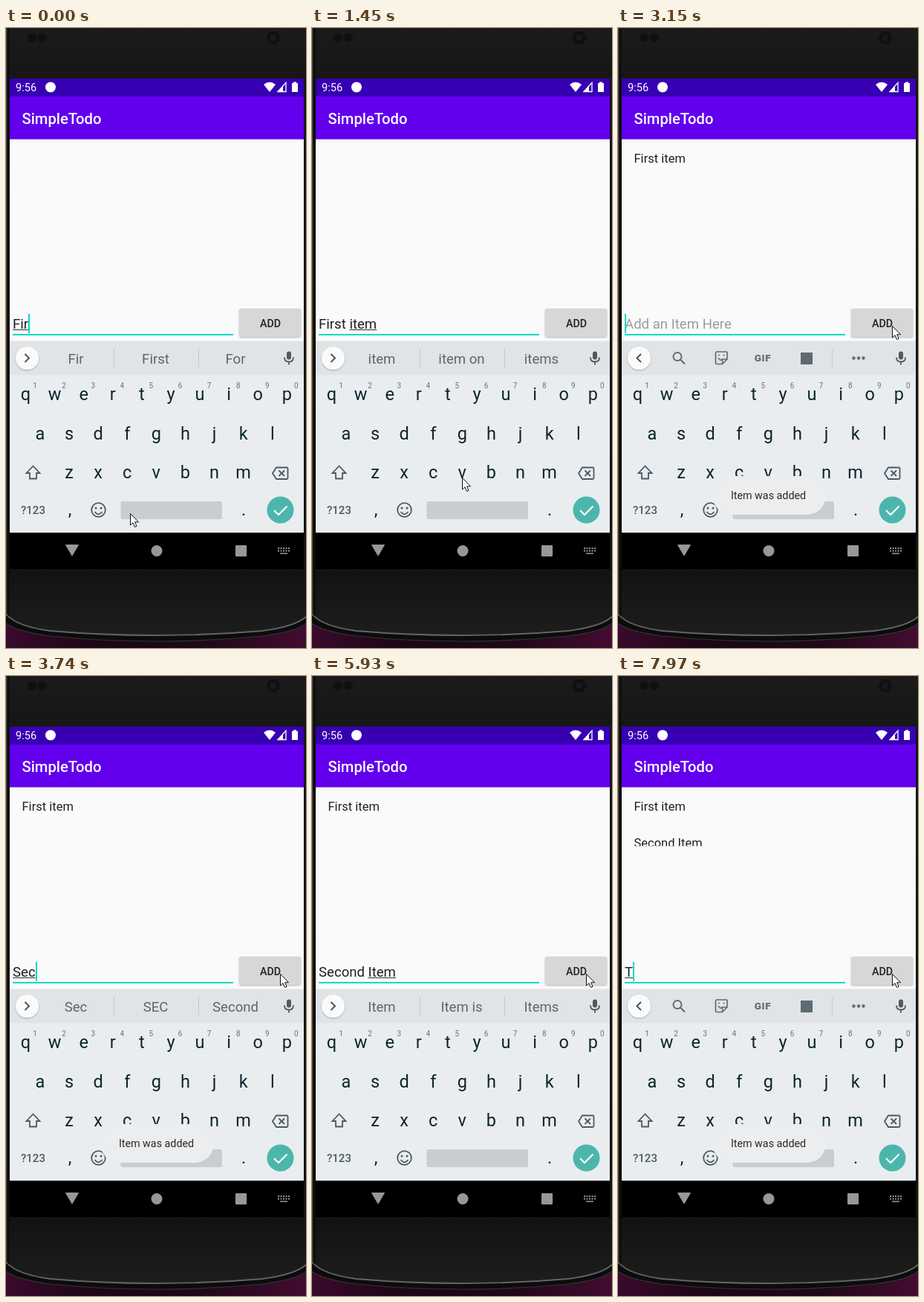
An HTML page for the animation above (8 s loop, 404 by 833 pixels).

```html
<!DOCTYPE html>
<html lang="en">
<head>
<meta charset="utf-8">
<title>SimpleTodo</title>
<style>
html, body { margin: 0; width: 100%; height: 100%; overflow: hidden; background: #141414; }
svg { display: block; width: 404px; height: 833px; font-family: Roboto, sans-serif; }
text { white-space: pre; }
.mid { text-anchor: middle; }
.key { font-size: 23.5px; fill: #0d252d; text-anchor: middle; }
.digit { font-size: 10px; fill: #66727a; text-anchor: middle; }
.sugg { font-size: 18.6px; fill: #5a666d; text-anchor: middle; }
.item { font-size: 16.5px; fill: #212121; }
.field { font-size: 18.6px; }
.line { fill: none; stroke: #4a5a63; stroke-width: 1.8; }
.tool { fill: none; stroke: #5f6b72; stroke-width: 2; }
</style>
</head>
<body>
<svg viewBox="0 0 404 833">
  <defs>
    <linearGradient id="shell" x2="0" y2="1">
      <stop offset="0" stop-color="#1b1b1b"/><stop offset=".08" stop-color="#161616"/>
      <stop offset=".9" stop-color="#131313"/><stop offset="1" stop-color="#1d1d1d"/>
    </linearGradient>
    <linearGradient id="floor">
      <stop offset="0" stop-color="#390a2c"/><stop offset=".3" stop-color="#1b0716"/>
      <stop offset=".65" stop-color="#1d0818"/><stop offset="1" stop-color="#430c31"/>
    </linearGradient>
    <filter id="soft" x="-20%" y="-30%" width="140%" height="170%">
      <feDropShadow dx="0" dy="1" stdDeviation="1" flood-opacity=".28"/>
    </filter>
    <clipPath id="rowClip"><rect x="5" y="150" width="396" height="78.5"/></clipPath>
  </defs>

  <!-- phone shell -->
  <rect width="404" height="833" fill="url(#floor)"/>
  <path d="M0 0H404V800Q392 811 345 817Q275 824 202 824Q130 824 60 817Q14 811 0 800Z" fill="#0c0c0c"/>
  <path d="M1 0H404V792Q390 804 345 810Q275 816 202 816Q130 816 60 810Q14 804 1 790Z" fill="url(#shell)"/>
  <path d="M1 788Q14 804 60 810Q130 816 202 816Q275 816 345 810Q390 804 404 791" fill="none" stroke="#646464" stroke-width="1.8"/>
  <path d="M0 800Q14 811 60 817Q130 824 202 824Q275 824 345 817Q392 811 404 800" fill="none" stroke="#333" stroke-width="1.2"/>
  <path d="M.5 0V790" stroke="#4b4b4b"/>
  <path d="M3.5 0V790" stroke="#0b0b0b" stroke-width="2"/>
  <g fill="#101010"><circle cx="35" cy="13" r="6"/><circle cx="49" cy="13" r="6"/><circle cx="360" cy="13" r="9"/></g>
  <circle cx="360" cy="13" r="4" fill="#17172a"/>

  <!-- app -->
  <rect x="5" y="68" width="396" height="24" fill="#3700b3"/>
  <rect x="5" y="92" width="396" height="58" fill="#6200ee"/>
  <rect x="5" y="149.5" width="396" height="272" fill="#fafafa"/>
  <g fill="#fff">
    <text x="13" y="85" font-size="14.6">9:56</text>
    <circle cx="60" cy="79.5" r="7"/>
    <path d="M347 76Q355 69.500 363 76L355 86Z"/>
    <path d="M366 85.500H377V73.500Z" fill="none" stroke="#fff" stroke-width="1.3"/>
    <path d="M365 86L373 77.500V86Z"/>
    <path d="M385 74H387V72.500H391V74H393V86H385Z"/>
    <text x="21.500" y="129" font-size="20.2" font-weight="500">SimpleTodo</text>
  </g>
  <g clip-path="url(#rowClip)">
    <text id="first" class="item" x="21.500" y="180.500">First item</text>
    <text id="second" class="item" x="21.500" y="229.500">Second Item</text>
  </g>

  <rect x="9" y="411" width="297" height="2" fill="#03dac5"/>
  <text id="hint" class="field" x="9" y="404" fill="#9b9b9b">Add an Item Here</text>
  <text id="typed" class="field" x="9" y="404" fill="#212121"></text>
  <rect id="compose" y="405" height="1" fill="#333"/>
  <rect id="caret" y="384" width="2" height="26" fill="#03dac5"/>
  <rect id="button" x="314" y="377" width="83" height="38" rx="2" filter="url(#soft)"/>
  <text class="mid" x="356" y="402" font-size="14.3" font-weight="500" fill="#212121">ADD</text>

  <!-- keyboard -->
  <rect x="5" y="420.500" width="396" height="46" fill="#e0e4e7"/>
  <rect x="5" y="466" width="396" height="212" fill="#e9edf0"/>
  <circle cx="28.500" cy="443.500" r="15.500" fill="#fafafa" filter="url(#soft)"/>
  <path id="chevron" fill="none" stroke="#4b5358" stroke-width="2"/>
  <g id="words">
    <path d="M145.500 431V456M259.500 431V456" stroke="#c4c9cc"/>
    <text class="sugg" x="94" y="450.500"></text>
    <text class="sugg" x="201.500" y="450.500"></text>
    <text class="sugg" x="309" y="450.500"></text>
  </g>
  <g id="tools">
    <g class="tool">
      <circle cx="80" cy="441.500" r="5.500"/><path d="M84 445.500L90 451.500"/>
      <path d="M133 435H146Q147 435 147 436V445L140.500 451.500H133Q131.500 451.500 131.500 450V436.500Q131.500 435 133 435ZM147 445H140.500V451.500" stroke-width="1.7"/>
      <path d="M135 443Q137.500 448 140 445M135 439.500H137M141.500 439.500H143.500" stroke-width="1.6"/>
    </g>
    <text class="mid" x="195" y="448" font-size="13.5" font-weight="800" fill="#5f6b72" letter-spacing=".6">GIF</text>
    <rect x="246" y="436" width="16" height="16" fill="#5f6b72"/>
    <path d="M288.500 432V455" stroke="#c4c9cc"/>
    <g fill="#5f6b72"><circle cx="317.500" cy="443.500" r="2.200"/><circle cx="324" cy="443.500" r="2.200"/><circle cx="330.500" cy="443.500" r="2.200"/></g>
  </g>
  <rect x="378" y="434.500" width="6" height="11" rx="3" fill="#4f5b62"/>
  <path d="M375 442.500Q375 448.500 381 448.500Q387 448.500 387 442.500M381 448.500V452.500" class="line" style="stroke:#4f5b62"/>

  <g id="keys"></g>
  <g class="line">
    <path d="M36.500 588.500L27.500 598H32V605.500H41V598H45.500Z"/>
    <path d="M364 590.500H378Q379.500 590.500 379.500 592V604.500Q379.500 606 378 606H364L359 598.250ZM367.500 594.500L375 602M375 594.500L367.500 602"/>
    <circle cx="124.500" cy="647.500" r="9.300"/>
    <path d="M119.500 650Q124.500 656.500 129.500 650"/>
  </g>
  <g fill="#4a5a63"><circle cx="121" cy="645" r="1.500"/><circle cx="128" cy="645" r="1.500"/></g>
  <text class="mid" x="36.500" y="653" font-size="15" font-weight="500" fill="#4a5a63">?123</text>
  <text class="key" x="86" y="655">,</text>
  <text class="key" x="320" y="655">.</text>
  <rect x="154.500" y="636" width="136.500" height="24" rx="3" fill="#c8cdd0"/>
  <circle cx="369.500" cy="647.500" r="18" fill="#4db6ac"/>
  <path d="M361 648L367 654L378.500 642.500" fill="none" stroke="#fff" stroke-width="2.200"/>

  <!-- navigation bar -->
  <rect x="5" y="678" width="396" height="49" fill="#000"/>
  <g fill="#989898">
    <path d="M80.500 694.500H97.500L89 709Z" stroke="#989898" stroke-linejoin="round"/>
    <circle cx="203" cy="702.500" r="7.500"/>
    <rect x="309" y="695" width="15" height="15" rx="1"/>
  </g>
  <path d="M366 699H382M366 702.500H382" stroke="#989898" stroke-width="1.800" stroke-dasharray="2 1.500"/>
  <path d="M369 706H379" stroke="#989898" stroke-width="1.500"/>

  <g id="toast">
    <rect x="127" y="602" width="153" height="52" rx="26" fill="#ebedef"/>
    <text class="mid" x="202.500" y="633" font-size="14.3" fill="#2a2a2a">Item was added</text>
  </g>
  <path id="mouse" d="M.5 .5V16L4 12.700L6.500 18.500L9 17.400L6.600 11.800H11.500Z" fill="#fff" stroke="#111"/>
</svg>
<script>
const LOOP = 8000;
const $ = id => document.getElementById(id);
const show = (id, on) => $(id).setAttribute('visibility', on ? 'visible' : 'hidden');
const set = (id, name, value) => $(id).setAttribute(name, value);

// Each track lists [start time, value]; a value holds until the next one.
const tracks = {
  typed: [[0, 'Fir'], [150, 'First'], [290, 'First '], [430, 'First it'], [570, 'First ite'],
    [710, 'First item'], [2550, ''], [3440, 'S'], [3590, 'Se'], [3740, 'Sec'], [3890, 'Secon'],
    [4020, 'Second'], [4610, 'Second '], [4880, 'Second I'], [5170, 'Second It'],
    [5310, 'Second Ite'], [5460, 'Second Item'], [7400, ''], [7970, 'T']],
  words: [[0, 'Fir|First|For'], [290, 'time|of|one'], [430, 'it|it is|its'], [570, 'ite|item|items'],
    [710, 'item|item on|items'], [2850, ''], [3590, 'Se|See|Set'], [3740, 'Sec|SEC|Second'],
    [3890, 'Secon|Second|Seconds'], [4020, 'Second|Seconds|Secondary'], [4760, 'time|one|half'],
    [4880, 'I|It|In'], [5170, 'It|It is|Its'], [5310, 'Ite|Item|Items'],
    [5460, 'Item|Item is|Items'], [7830, '']],
  caret: [[0, true], [1170, false], [1730, true], [2130, false], [2550, true],
    [5930, false], [6390, true], [6840, false], [7400, true]],
  toast: [[0, 0], [2700, .5], [2850, 1], [4760, .55], [4880, 0], [7540, .5], [7690, 1]],
  button: [[0, '#d6d7d7'], [2420, '#c8c9c9'], [2550, '#babbbb'], [2700, '#c9caca'], [2850, '#d6d7d7'],
    [7250, '#c8c9c9'], [7400, '#babbbb'], [7540, '#c9caca'], [7690, '#d6d7d7']],
  mouse: [[0, '167 652'], [1450, '202 604'], [1580, '262 522'], [1730, '318 456'],
    [1870, '349 424'], [2010, '365 405'], [2130, '369 400']],
  rows: [[0, 0], [2700, 1], [7540, 2]]
};
const at = (name, t) => tracks[name].findLast(([start]) => start <= t)[1];

const pen = document.createElement('canvas').getContext('2d');
pen.font = '18.6px Roboto, sans-serif';
const width = s => pen.measureText(s).width;

function addKeys(letters, x, y, digits = '') {
  [...letters].forEach((letter, i) => {
    const cx = x + i * 39.1;
    let html = `<text class="key" x="${cx}" y="${y}">${letter}</text>`;
    if (digits) html += `<text class="digit" x="${cx + 12.5}" y="484">${digits[i]}</text>`;
    $('keys').insertAdjacentHTML('beforeend', html);
  });
}
addKeys('qwertyuiop', 26.5, 500, '1234567890');
addKeys('asdfghjkl', 46, 552.5);
addKeys('zxcvbnm', 85, 604.5);

function draw(now) {
  const t = now % LOOP;
  const typed = at('typed', t), words = at('words', t), rows = at('rows', t);
  const wordStart = typed.lastIndexOf(' ') + 1;
  const end = width(typed), from = width(typed.slice(0, wordStart));

  $('typed').textContent = typed;
  show('hint', !typed);
  set('compose', 'x', 9 + from);
  set('compose', 'width', end - from);
  set('caret', 'x', Math.round(9 + end));
  show('caret', at('caret', t));

  show('words', words);
  show('tools', !words);
  const labels = words.split('|');
  document.querySelectorAll('.sugg').forEach((el, i) => { el.textContent = labels[i] || ''; });
  set('chevron', 'd', words ? 'M25.5 438L31 443.500L25.500 449' : 'M31 438L25.500 443.500L31 449');

  show('first', rows > 0);
  show('second', rows > 1);
  set('button', 'fill', at('button', t));
  set('toast', 'opacity', at('toast', t));
  set('mouse', 'transform', `translate(${at('mouse', t)})`);
  requestAnimationFrame(() => draw(performance.now()));
}
draw(0);
</script>
</body>
</html>
```
